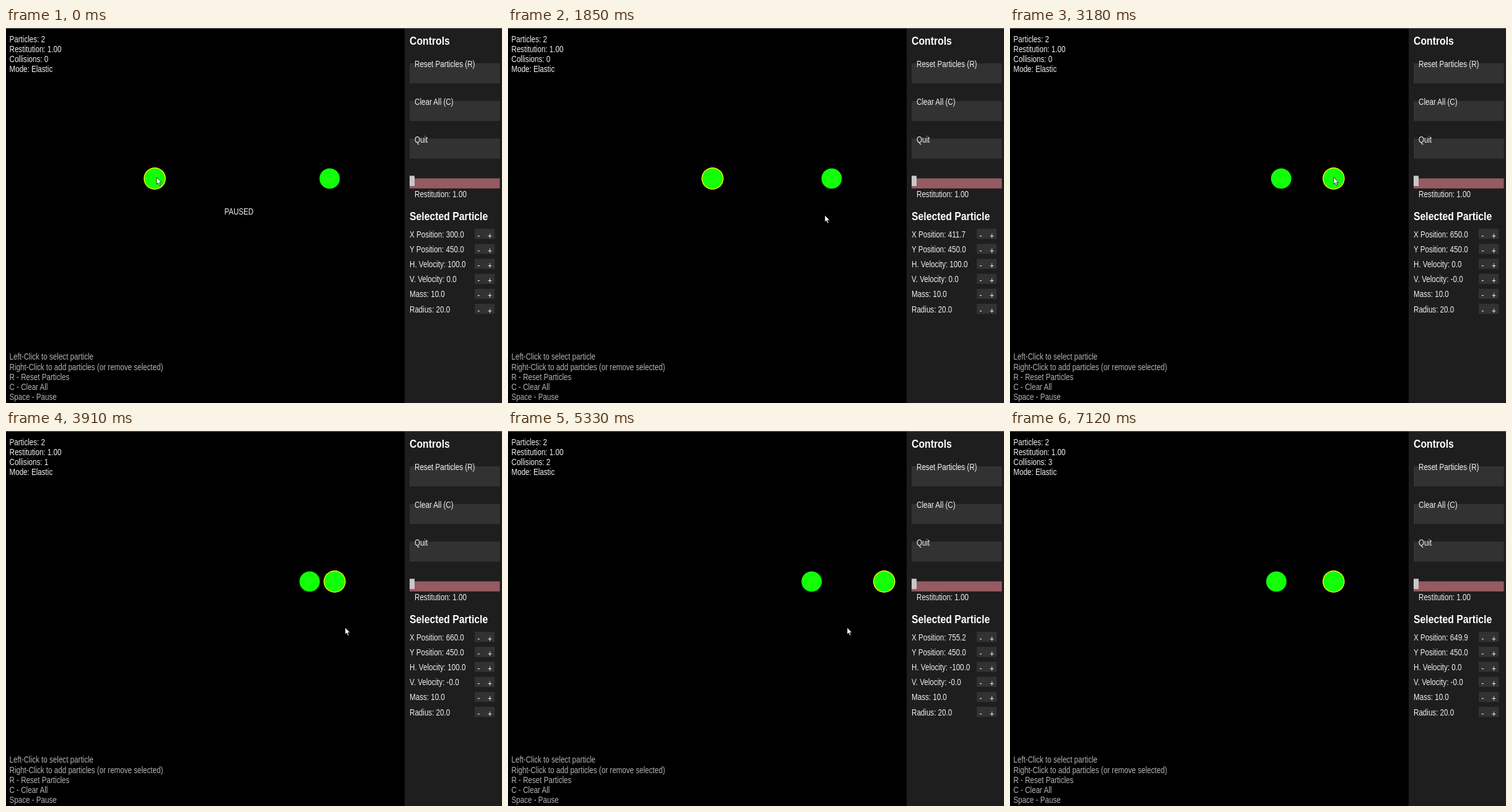
An HTML page that plays this animation: 800x605 px, repeating every 7.15 s.

```html
<!DOCTYPE html>
<html lang="en">
<head>
<meta charset="utf-8">
<title>Particle collisions</title>
<style>
  html, body { margin: 0; width: 100%; height: 100%; overflow: hidden; background: #000; }
  svg { display: block; width: 800px; height: 605px; }
  text { font: 14.5px "Liberation Sans", Arial, sans-serif; fill: #f0f0f0; white-space: pre; }
  .hint { fill: #b4b4b4; }
  .head { font-size: 18.4px; font-weight: bold; fill: #fff; }
</style>
</head>
<body>
<svg id="stage" viewBox="0 0 800 605" xmlns="http://www.w3.org/2000/svg"></svg>
<script>
const LOOP = 7150;
const CONDENSED = 0.802, CONDENSED_BOLD = 0.858;
const GREEN = '#12ff09';
const stage = document.getElementById('stage');

function add(tag, attrs) {
  const el = document.createElementNS('http://www.w3.org/2000/svg', tag);
  for (const key in attrs) el.setAttribute(key, attrs[key]);
  return stage.appendChild(el);
}
const rect = (x, y, width, height, fill) => add('rect', { x, y, width, height, fill });
function label(x, y, str, cls = '', squeeze = CONDENSED) {
  const el = add('text', { class: cls, transform: `translate(${x} ${y}) scale(${squeeze} 1)` });
  el.textContent = str;
  return el;
}

// Simulation view
rect(0, 0, 800, 605, '#000');
const stats = ['Particles: 2', 'Restitution: 1.00', 'Collisions: 0', 'Mode: Elastic']
  .map((str, i) => label(5.5, 23 + i * 16.1, str));
['Left-Click to select particle', 'Right-Click to add particles (or remove selected)',
  'R - Reset Particles', 'C - Clear All', 'Space - Pause']
  .forEach((str, i) => label(5.5, 535.4 + i * 16.1, str, 'hint'));
const paused = label(352.3, 301.2, 'PAUSED');
const ring = add('circle', { cy: 242.9, r: 17.8, fill: '#ff0' });
const balls = [0, 1].map(() => add('circle', { cy: 242.9, r: 16.4, fill: GREEN }));

// Control panel
rect(643, 0, 157, 605, '#1e1e1e');
label(651, 27.4, 'Controls', 'head', CONDENSED_BOLD);
['Reset Particles (R)', 'Clear All (C)', 'Quit'].forEach((str, i) => {
  rect(651, 57 + i * 60.7, 145.5, 32.3, '#323232');
  label(659, 63.4 + i * 60.6, str);
});
rect(651, 242.6, 145.5, 16.2, '#965a62');
rect(651, 238.4, 8, 16.6, '#c8c8c8');
label(659, 273.3, 'Restitution: 1.00');
label(651, 309.8, 'Selected Particle', 'head', CONDENSED_BOLD);
const fields = ['', 'Y Position: 450.0', '', '', 'Mass: 10.0', 'Radius: 20.0'].map((str, i) => {
  const y = 337.5 + i * 24.2;
  rect(756, y - 13.5, 32.2, 16.2, '#323232');
  label(760.5, y + 2, '-');
  label(777, y + 2, '+');
  return label(651, y, str);
});
rect(0, 0, 800, 1, '#666');

const cursor = add('path', {
  d: 'M0 0V11L2.5 8.8L4.3 13L6.2 12.2L4.4 8.2H7.8Z',
  fill: '#fff', stroke: '#000', 'stroke-width': 0.7
});

// [video frame, physics step]
const STEPS = [[0, 0], [22, 0], [35, 26], [75, 107], [117, 192], [143, 244], [177, 313], [214, 386.5]];
// [video frame, x, y]
const POINTER = [[0, 243, 241], [7, 250.3, 247], [36, 250.3, 247], [54, 511, 302], [80, 511, 302],
  [92, 522, 241], [96, 522, 241], [106, 547, 317], [163, 547, 317], [177, 494, -12], [179, 492, -30], [214, 492, -30]];

function track(keys, v, ease = u => u) {
  let i = 1;
  while (i < keys.length - 1 && v > keys[i][0]) i++;
  const a = keys[i - 1], b = keys[i];
  const u = ease(Math.min(1, (v - a[0]) / (b[0] - a[0])));
  return a.slice(1).map((p, j) => p + (b[j + 1] - p) * u);
}
const smooth = u => u * u * (3 - 2 * u);

const MOVE = 5 / 3;                        // units per physics step
const HIT = 186, WALL = 264, RETURN = 342.2;
const START = 22, CLICK = 94;
const screenX = x => 239.9 + 0.806 * (x - 300);

function state(s) {
  const left = s < HIT ? { x: 300 + s * MOVE, v: 100 }
    : s < RETURN ? { x: 610, v: 0 }
    : { x: 610 - (s - RETURN) * MOVE, v: -100 };
  const travel = (s - HIT) * MOVE;
  const right = s < HIT ? { x: 650, v: 0 }
    : s < WALL ? { x: 650 + travel, v: 100 }
    : s < RETURN ? { x: 910.17 - travel, v: -100 }
    : { x: 649.9, v: 0 };
  return [left, right];
}

function draw(t) {
  const slot = Math.floor((t + 5) * 33 / 1000 + 1e-6);
  const v = Math.min(214, Math.floor(slot * 10 / 11 + 0.4));
  const s = Math.round(track(STEPS, v)[0]);
  const parts = state(s);
  const chosen = v < CLICK ? 0 : 1;
  const p = parts[chosen];

  balls.forEach((ball, i) => ball.setAttribute('cx', screenX(parts[i].x)));
  ring.setAttribute('cx', screenX(p.x));
  paused.setAttribute('visibility', v <= START ? 'visible' : 'hidden');
  stats[2].textContent = 'Collisions: ' + [HIT, WALL, RETURN].filter(k => s >= k).length;
  fields[0].textContent = 'X Position: ' + p.x.toFixed(1);
  fields[2].textContent = 'H. Velocity: ' + p.v.toFixed(1);
  fields[3].textContent = 'V. Velocity: ' + (chosen ? '-0.0' : '0.0');
  cursor.setAttribute('transform', `translate(${track(POINTER, v, smooth).join(' ')})`);
}

const begin = performance.now();
function tick() {
  draw((performance.now() - begin) % LOOP);
  requestAnimationFrame(tick);
}
draw(0);
requestAnimationFrame(tick);
</script>
</body>
</html>
```
